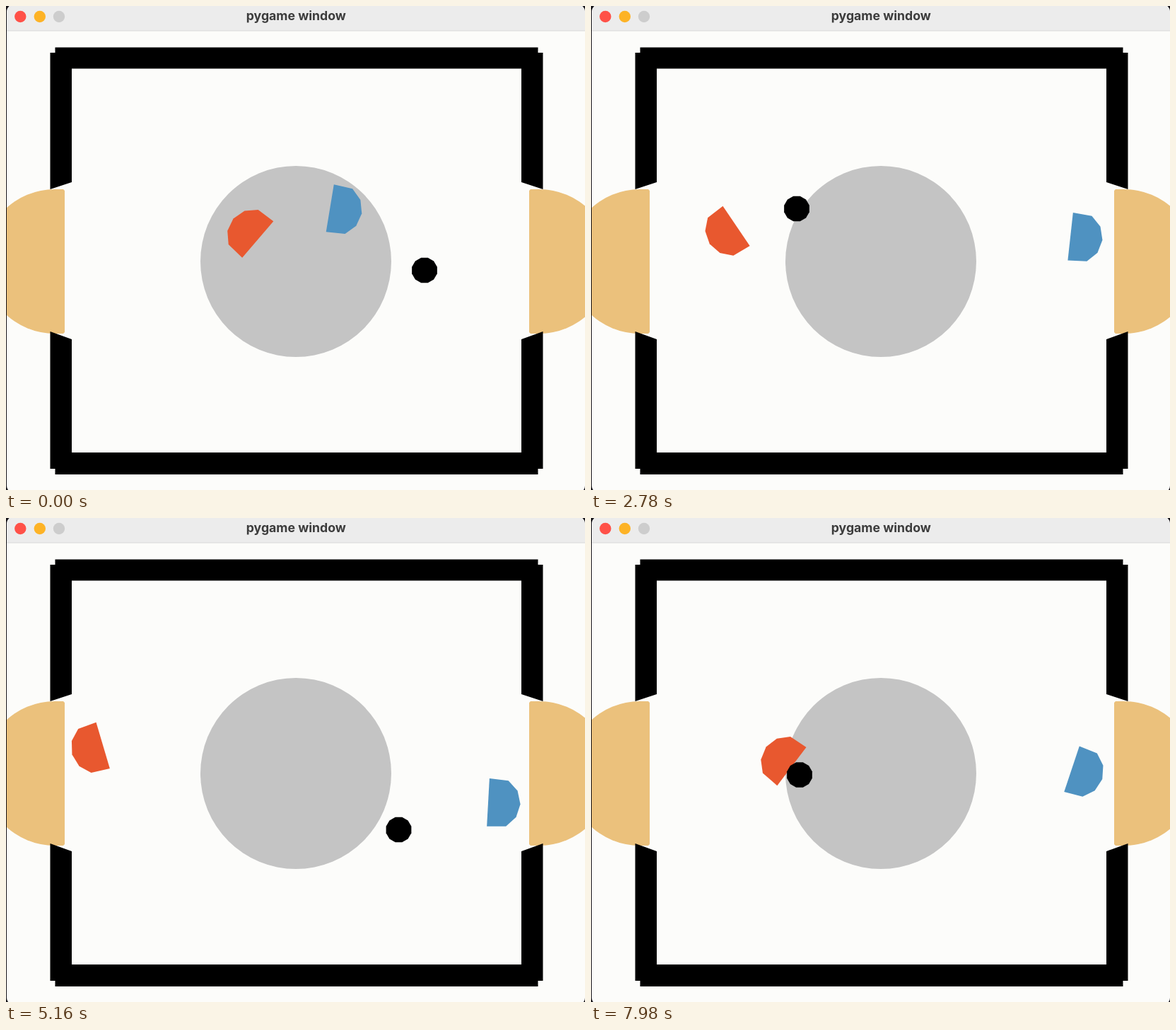
An HTML page for the animation above (8 s loop, 819 by 684 pixels).

```html
<!DOCTYPE html>
<html lang="en">
<head>
<meta charset="utf-8">
<title>pygame window</title>
<style>
  html, body { margin: 0; width: 100%; height: 100%; overflow: hidden; background: #17151a; }
  svg { display: block; width: 819px; height: 684px; }
  .title { font: 700 17.7px Inter, "Open Sans", sans-serif; fill: #3c3c3c; text-anchor: middle; }
</style>
</head>
<body>
<svg viewBox="0 0 819 684">
  <defs>
    <clipPath id="window"><rect x="1" y="-2" width="818" height="690" rx="10"/></clipPath>
    <path id="goal" d="M69 259H81L83 261V461L81 463H69A102 102 0 0 1 69 259Z"/>
    <path id="walls" d="M411 58.5H69.500V66H62.500V259L93 249V88.500H411Z
                        M411 662H69.500V654H62.500V460L93 471V631H411Z"/>
  </defs>
  <g clip-path="url(#window)">
    <rect width="819" height="684" fill="#fcfcfa"/>
    <rect width="819" height="35" fill="#ececec"/>
    <rect y="34.5" width="819" height="1" fill="#d9d9d9"/>
    <circle cx="20.3" cy="15" r="8.2" fill="#ff5148"/>
    <circle cx="47.8" cy="15" r="8.2" fill="#fdb326"/>
    <circle cx="75" cy="15" r="8.2" fill="#cdcdcd"/>
    <text class="title" x="410.3" y="20.3">pygame window</text>

    <g fill="#ebc17c">
      <use href="#goal"/>
      <use href="#goal" transform="matrix(-1 0 0 1 823 0)"/>
    </g>
    <circle cx="410" cy="361" r="135" fill="#c4c4c4"/>
    <use href="#walls"/>
    <use href="#walls" transform="matrix(-1 0 0 1 822 0)"/>

    <polygon id="red" fill="#e8582f"/>
    <polygon id="blue" fill="#4f92c1"/>
    <polygon id="ball"/>
  </g>
</svg>
<script>
const LOOP = 8000;

// Vertices of a regular 12-gon, count of them from the given angle in degrees.
function arc(radius, from, count, cx = 0) {
  return Array.from({ length: count }, (_, i) => {
    const a = (from + 30 * i) * Math.PI / 180;
    return [cx + radius * Math.cos(a), radius * Math.sin(a)];
  });
}

// A player is a flat front edge closed by a rounded back.
const PLAYER = [[20, 34], ...arc(37.3, 120, 5, 11.7), [20, -34]];
const BALL = arc(18.5, 15, 12);

const sway = (mean, swing, period, peak) =>
  step => mean + swing * Math.cos(2 * Math.PI * (step - peak) / period);

// Steps at which the paths bend, shared by all three.
const BENDS = [1, 36, 60, 77, 111, 146, 172];
const actors = [
  { id: 'red', shape: PLAYER, heading: sway(-2, 43, 164, -3),
    path: [[341, 317], [288, 327], [189, 322], [284, 210], [118, 327], [114, 433], [268, 339]] },
  { id: 'blue', shape: PLAYER, heading: sway(180, 54, 108, 85),
    path: [[478, 289], [512, 295], [698, 328], [639, 285], [702, 403], [573, 377], [699, 361]] },
  { id: 'ball', shape: BALL, heading: () => 0,
    path: [[592, 373.5], [323.5, 322], [291, 286.5], [307, 183], [555.5, 440.5], [511.5, 462.5], [295, 363]] }
];
for (const actor of actors) {
  actor.node = document.getElementById(actor.id);
  actor.node.setAttribute('points', actor.shape.join(' '));
}

// Steps advance in groups of three, held for 20, 20 and 100 ms.
function stepAt(ms) {
  const t = ms + 20;
  return 3 * Math.floor(t / 140) + Math.min(2, Math.floor(t % 140 / 20));
}

function along(path, step) {
  const i = Math.max(0, BENDS.findIndex(bend => bend >= step) - 1);
  const k = (step - BENDS[i]) / (BENDS[i + 1] - BENDS[i]);
  return path[i].map((v, axis) => v + (path[i + 1][axis] - v) * k);
}

function draw(ms) {
  const step = stepAt(ms % LOOP);
  for (const { node, path, heading } of actors) {
    node.setAttribute('transform', `translate(${along(path, step)}) rotate(${heading(step)})`);
  }
}

const start = performance.now();
function tick() {
  draw(performance.now() - start);
  requestAnimationFrame(tick);
}
draw(0);
requestAnimationFrame(tick);
</script>
</body>
</html>
```
